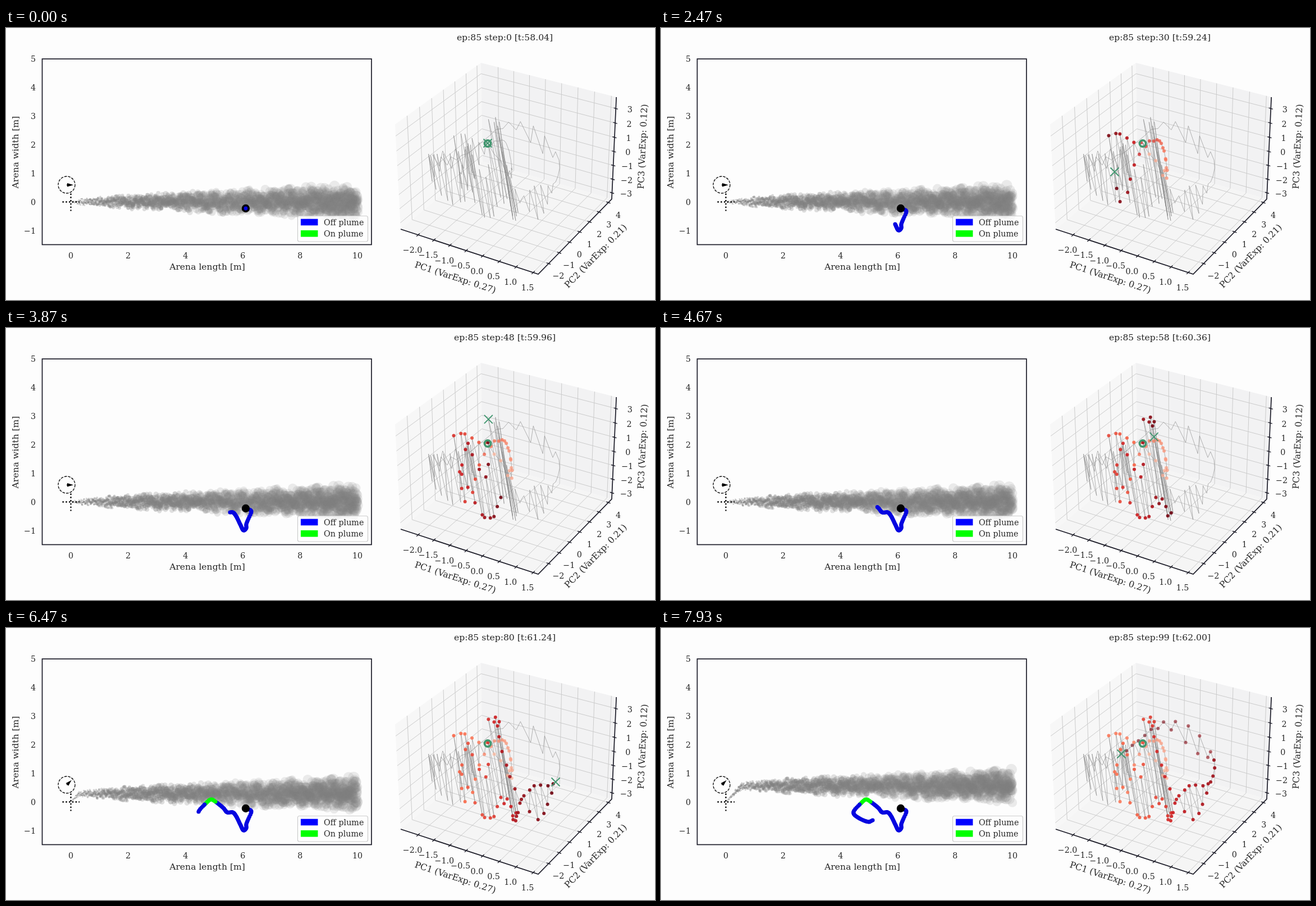
Animation of 1156 by 484 pixels, one loop 8 s. Source, as an HTML page with a canvas:

```html
<!DOCTYPE html>
<html lang="en">
<head>
<meta charset="utf-8">
<title>Plume tracking</title>
<style>
html, body { margin: 0; width: 100%; height: 100%; overflow: hidden; background: #fdfdfd; }
canvas, svg { position: absolute; left: 0; top: 0; width: 1156px; height: 484px; }
text { font-family: "DejaVu Serif", "Noto Serif", serif; font-size: 14.3px; fill: #262626; text-anchor: middle; }
.label { font-size: 15.6px; }
.start { text-anchor: start; }
.end { text-anchor: end; }
</style>
</head>
<body>
<canvas id="plume" width="1156" height="484"></canvas>
<svg id="stage" viewBox="0 0 1156 484"></svg>
<script>
const LOOP = 8000, STEPS = 100, INK = '#1c1c28';
const ctx = document.getElementById('plume').getContext('2d');
const stage = document.getElementById('stage');

function add(tag, attrs, content) {
  const el = document.createElementNS('http://www.w3.org/2000/svg', tag);
  for (const key in attrs) el.setAttribute(key, attrs[key]);
  if (content !== undefined) el.textContent = content;
  return stage.appendChild(el);
}
function text(content, x, y, cls = '', angle = 0) {
  return add('text', { x, y, dy: '.36em', class: cls, transform: `rotate(${angle} ${x} ${y})` }, content);
}
function line(points, stroke, width, extra) {
  return add('polyline', { points: points.join(' '), fill: 'none', stroke, 'stroke-width': width, ...extra });
}
const circle = (cx, cy, r, fill, extra) => add('circle', { cx, cy, r, fill, ...extra });
const signed = n => String(n).replace('-', '\u2212');
const range = (from, to, by = 1) => Array.from({ length: Math.round((to - from) / by) + 1 }, (_, i) => from + i * by);
const mix = (a, b, f) => a + (b - a) * f;

let seed = 85;
function rand() {
  seed = (seed * 1664525 + 1013904223) >>> 0;
  return seed / 4294967296;
}
const spread = size => (rand() + rand() - 1) * size;

// Smooth curve through keys of the form [step, ...values]
function sample(keys, step) {
  const i = Math.max(1, keys.findIndex(k => k[0] >= step));
  const a = keys[i - 1], b = keys[i];
  const before = keys[i - 2] || a, after = keys[i + 1] || b;
  const span = b[0] - a[0], f = (step - a[0]) / span;
  return a.slice(1).map((start, n) => {
    const end = b[n + 1];
    const m0 = (end - before[n + 1]) / (b[0] - before[0]) * span;
    const m1 = (after[n + 1] - start) / (after[0] - a[0]) * span;
    const ease = f * f * (3 - 2 * f);
    return mix(start, end, ease) + f * (1 - f) * ((1 - f) * m0 - f * m1);
  });
}

// ---- Arena plot
const arenaX = x => 115.5 + 51.05 * x;
const arenaY = y => 309.5 - 50.9 * y;
const TURN = 60;      // step at which the wind veers

// step, x, y
const walk = [
  [0, 427, 321], [5, 437, 326], [9, 432, 339], [13, 428, 349], [17, 428, 356], [22, 423, 360],
  [30, 417, 349], [39, 410, 335], [45, 404, 328], [51, 394, 328], [57, 387, 320], [65, 373, 309],
  [69, 365, 305], [74, 356, 312], [80, 343, 327], [86, 349, 336], [95, 369, 345], [99, 377, 342]
];

add('circle', { cx: 108, cy: 279, r: 15, fill: 'none', stroke: '#000', 'stroke-width': 1.3, 'stroke-dasharray': '4.6 2' });
const arrow = add('path', { d: 'M108 278.4H109V276L120 279.3L109 282.6V280.2H108Z', fill: '#000' });
for (const cross of [[[100.5, 309.5], [131, 309.5]], [[115.5, 294.5], [115.5, 325.5]]])
  line(cross, '#000', 2.4, { 'stroke-dasharray': '2.4 3.4' });

const onPlume = i => i >= 65 && i <= 74;
const trail = range(0, STEPS - 1).map(i => circle(...sample(walk, i), 3.6, onPlume(i) ? '#0f0' : '#0505e0'));
circle(427, 321, 7.2, '#000');
const firstDot = circle(427, 321, 3.4, '#0505e0');

add('rect', { x: 64.5, y: 55, width: 586.5, height: 330.5, fill: 'none', stroke: INK, 'stroke-width': 1.7 });
for (const y of range(-1, 5)) text(signed(y), 53, arenaY(y), 'end');
for (const x of range(0, 10, 2)) text(x, arenaX(x), 404.5);
text('Arena length [m]', 358.5, 424.5, 'label');
text('Arena width [m]', 16.5, 221, 'label', -90);

add('rect', { x: 519.5, y: 334.5, width: 125, height: 45.5, rx: 3, fill: '#fff', 'fill-opacity': 0.8, stroke: '#ccc', 'stroke-width': 1.2 });
[['Off plume', '#00f', 345.5], ['On plume', '#0f0', 365.8]].forEach(([name, fill, y]) => {
  add('rect', { x: 525, y: y - 5.8, width: 30.5, height: 11.6, fill });
  text(name, 566, y, 'start');
});

// ---- 3D plot, unit cube in homogeneous screen coordinates
function project(u, v, w) {
  const o = [703, 358, 1];
  const axes = [[0.949, 948, 438, u], [1.092, 848.5, 237.4, v], [0.953, 693, 171.5, w]];
  const h = o.slice();
  for (const [k, x, y, t] of axes)
    [x, y, 1].forEach((c, i) => h[i] += t * (k * c - o[i]));
  return [h[0] / h[2], h[1] / h[2]];
}
const toU = x => (x + 2.557) * 0.2379;
const toV = y => (y + 2.95) * 0.1367;
const toW = z => (z + 3.46) * 0.1383;
const lineIn3d = (corners, ...style) => line(corners.map(c => project(...c)), ...style);

[['#f7f7f7', [0, 0, 0], [0, 1, 0], [0, 1, 1], [0, 0, 1]],
 ['#f2f2f3', [0, 1, 0], [1, 1, 0], [1, 1, 1], [0, 1, 1]],
 ['#f5f5f5', [0, 0, 0], [1, 0, 0], [1, 1, 0], [0, 1, 0]]].forEach(([fill, ...corners]) =>
  add('polygon', { points: corners.map(c => project(...c)).join(' '), fill }));

const xTicks = range(-2, 1.5, 0.5), yTicks = range(-2, 4), zTicks = range(-3, 3);
const GRID = '#cbcbcb';
for (const u of xTicks.map(toU)) lineIn3d([[u, 0, 0], [u, 1, 0], [u, 1, 1]], GRID, 1);
for (const v of yTicks.map(toV)) lineIn3d([[1, v, 0], [0, v, 0], [0, v, 1]], GRID, 1);
for (const w of zTicks.map(toW)) lineIn3d([[0, 0, w], [0, 1, w], [1, 1, w]], GRID, 1);
lineIn3d([[0, 0, 0], [1, 0, 0], [1, 1, 0], [1, 1, 1]], INK, 1.7);

function tick([x, y], dx, dy, label, lx, ly) {
  line([[x - dx, y - dy], [x + dx, y + dy]], INK, 1.4);
  text(signed(label), x + lx, y + ly);
}
for (const x of xTicks) tick(project(toU(x), 0, 0), 2.8, -2.6, x.toFixed(1), -10, 27);
for (const y of yTicks) tick(project(1, toV(y), 0), 3.6, 1.3, y, 17.5, 22);
for (const z of zTicks) tick(project(1, 1, toW(z)), 3.6, 1.1, z, 25, 1.5);
text('PC1 (VarExp: 0.27)', 800.5, 443.5, 'label', 18);
text('PC2 (VarExp: 0.21)', 1050, 405.5, 'label', -45.6);
text('PC3 (VarExp: 0.12)', 1133.5, 211, 'label', -87.5);
const title = text('', 888.5, 16.5, 'label');

// Network state: a drifting centre with a swing that flips on every step.
// step, centre x, centre y, swing
const drift = [
  [0, 858, 205, 0], [4, 898, 262, 8], [13, 888, 201, 0], [19, 850, 215, 10], [28, 810, 250, 60],
  [30, 808, 256, 0], [36, 832, 262, 58], [42, 860, 300, 35], [48, 875, 236, 65], [56, 890, 252, 82],
  [63, 902, 295, 40], [68, 918, 305, 0], [72, 942, 312, -28], [80, 979, 274, 0], [83, 985, 235, 0],
  [87, 952, 202, 22], [92, 896, 172, 5], [99, 820, 224, 0], [108, 757, 247, 22], [117, 790, 270, 45],
  [124, 830, 235, 25], [132, 760, 235, 10]
];
const states = range(0, 132).map(i => {
  const [x, y, swing] = sample(drift, i);
  const side = i % 2 ? swing : -swing;
  return [x + side * 0.16 + spread(swing * 0.1), y + side + spread(swing * 0.15)];
});
line(states, '#858585', 0.8, { 'stroke-opacity': 0.75 });

const reds = [[255, 245, 240], [252, 187, 161], [251, 106, 74], [203, 24, 29], [103, 0, 13]];
function red(f) {
  const p = Math.min(f, 0.9999) * 4, i = Math.floor(p);
  return `rgb(${reds[i].map((c, k) => Math.round(mix(c, reds[i + 1][k], p - i)))})`;
}
const MARK = '#41966f';
const depthAlpha = i => i < 20 ? 0.75 : i > 83 ? 0.6 : 0.9;
const dots = states.slice(0, STEPS).map(([x, y], i) => circle(x, y, 3, 'none', { 'fill-opacity': depthAlpha(i) }));
circle(858, 205.5, 5.6, 'none', { stroke: MARK, 'stroke-width': 3.6 });
const marker = add('path', { d: 'M-7.5-7.5L7.5 7.5M-7.5 7.5L7.5-7.5', stroke: MARK, 'stroke-width': 1.9 });

// ---- Plume: puffs carried by the wind since birth
const puffs = range(0, 2480).map(i => ({ born: i / 4 - 520, side: spread(9.5), size: 0.85 + 0.3 * rand() }));
const rise = s => Math.max(0, s - TURN) * 0.0143;
const reach = s => 0.02 * Math.min(s, TURN) + rise(s);

function drawPlume(step) {
  ctx.clearRect(0, 0, 1156, 484);
  for (const p of puffs) {
    const x = reach(step) - reach(p.born);
    if (x <= 0 || x > 10) continue;
    const y = arenaY(rise(step) - rise(p.born)) + p.side * Math.sqrt(x);
    const r = (0.3 + 1.8 * Math.pow(x, 0.69)) * p.size;
    ctx.fillStyle = `rgba(128,128,128,${Math.max(0.15, 0.36 - 0.035 * x)})`;
    ctx.beginPath();
    ctx.arc(arenaX(x), y, r, 0, 2 * Math.PI);
    ctx.fill();
  }
}

// ---- Playback: 100 steps shown on 120 ticks per loop
let shown = -1;
function show(step) {
  drawPlume(step);
  title.textContent = `ep:85 step:${step} [t:${(58.04 + 0.04 * step).toFixed(2)}]`;
  arrow.setAttribute('transform', `rotate(${step >= TURN ? -45 : 0} 108 279)`);
  trail.forEach((dot, i) => dot.setAttribute('visibility', i <= step ? 'visible' : 'hidden'));
  firstDot.setAttribute('visibility', step ? 'hidden' : 'visible');
  dots.forEach((dot, i) => dot.setAttribute('fill', i > 0 && i < step ? red(0.25 + 0.75 * i / step) : 'none'));
  marker.setAttribute('transform', `translate(${states[step]})`);
}
const origin = performance.now();
function play() {
  const t = Math.max(0, performance.now() - origin) % LOOP;
  const beat = Math.floor((Math.floor(t / 10) * 10 + 5) / (LOOP / 120));
  const step = Math.min(STEPS - 1, Math.floor(beat * 5 / 6));
  if (step !== shown) show(shown = step);
  requestAnimationFrame(play);
}
play();
</script>
</body>
</html>
```
